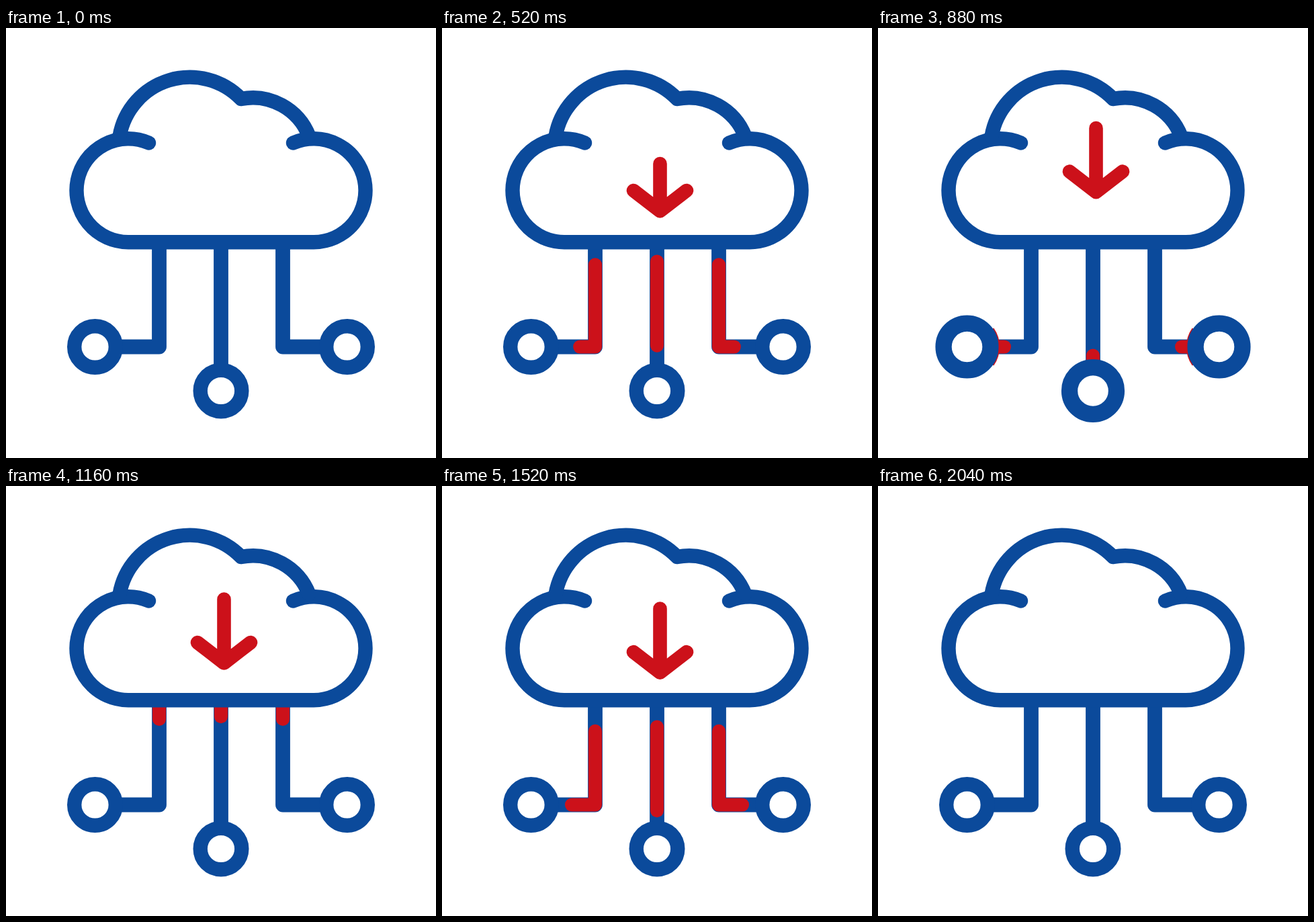
These frames come from a looping animation (640 px wide and 640 px high, 2.48 s). An HTML page:

```html
<!DOCTYPE html>
<html lang="en">
<head>
<meta charset="utf-8">
<title>Cloud download</title>
<style>
  html, body { margin: 0; width: 100%; height: 100%; overflow: hidden; background: #fff; }
  svg { display: block; width: 100%; height: 100%; fill: none; stroke: #0b4a9b;
        stroke-width: 21.4; stroke-linecap: round; stroke-linejoin: round; }
  .red { stroke: #cc111a; stroke-width: 20.6; }
  .wire { stroke-width: 21.8; }
  .flow { stroke-width: 20.2; }
  .rim { stroke-width: 2.2; stroke-linecap: butt; }
  circle { fill: #fff; }
</style>
</head>
<body>
<svg viewBox="0 0 640 640">
  <g id="wires"></g>
  <path d="M212.5 171A77 77 0 1 0 182 318.7H458A77 77 0 1 0 427.5 171"/>
  <path d="M169 161A106.3 106.3 0 0 1 350 105.5A90 90 0 0 1 451 161"/>
  <g id="nodes"></g>
  <path id="arrow" class="red"/>
</svg>
<script>
const LOOP = 2480, STEP = 40, START = 120, END = 2040, PASS = 968;
const $ = id => document.getElementById(id);
const wires = ['M228 319V474.5H163', 'M320 319V509', 'M412 319V474.5H477'];
const nodes = [[132.5, 474.5, 0], [320, 540], [507.5, 474.5, 180]];

$('wires').innerHTML = wires.map(d => `<path class="wire" d="${d}"/>`).join('') +
  wires.map(d => `<path class="red flow" pathLength="1" d="${d}"/>`).join('');

// Side nodes show a thin red rim towards their wire while they swell.
$('nodes').innerHTML = nodes.map(([x, y, turn]) =>
  `<g transform="translate(${x} ${y})"><g class="node">` +
  (turn === undefined ? '' :
    `<path class="red rim" transform="rotate(${turn})" d="M34.2 -24A41.8 41.8 0 0 1 34.2 24"/>`) +
  '<circle r="30.8"/></g></g>').join('');

const flows = document.querySelectorAll('.flow');
const swells = document.querySelectorAll('.node');
const rims = document.querySelectorAll('.rim');

// Eased progress from 0 to 1, starting at `from` and lasting `span` ms.
function ease(t, from, span) {
  const p = Math.min(1, Math.max(0, (t - from) / span));
  return p * p * (3 - 2 * p);
}

function drawFlow(t) {
  const u = t < 1020 ? t : t - PASS;
  const head = t ? ease(u, 45, 660) : 0, tail = ease(u, 358, 660);
  for (const f of flows) {
    f.style.display = head - tail > 0.0001 ? '' : 'none';
    f.setAttribute('stroke-dasharray', `${head - tail} 3`);
    f.setAttribute('stroke-dashoffset', -tail);
  }
}

function drawNodes(t) {
  const pulse = from => ease(t, from, 240) - ease(t, from + 240, 240);
  const p = pulse(600) + pulse(600 + PASS);
  for (const n of swells) n.setAttribute('transform', `scale(${1 + 0.145 * p})`);
  for (const r of rims) r.style.display = p > 0.5 ? '' : 'none';
}

function drawArrow(t) {
  const wing = ease(t, 80, 280) - ease(t, 1760, 240);
  const shaft = 95 * (ease(t, 360, 240) - ease(t, 1520, 240));
  const y = 258.3 + 20 * Math.cos((t - 100) / 480 * 2 * Math.PI);
  const dx = 39.5 * wing, top = y - 30.5 * wing;
  $('arrow').style.display = wing > 0 ? '' : 'none';
  $('arrow').setAttribute('d',
    `M${324.5 - dx} ${top}L324.5 ${y}L${324.5 + dx} ${top}M324.5 ${y}V${y - shaft}`);
}

function draw(now) {
  let t = Math.floor(now % LOOP / STEP) * STEP;
  if (t < START || t >= END) t = 0;
  else if (t > 1520) t -= STEP; // a one-step hold late in the second pass
  drawFlow(t);
  drawNodes(t);
  drawArrow(t);
}

const began = performance.now();
function tick() {
  draw(performance.now() - began);
  requestAnimationFrame(tick);
}
tick();
</script>
</body>
</html>
```
